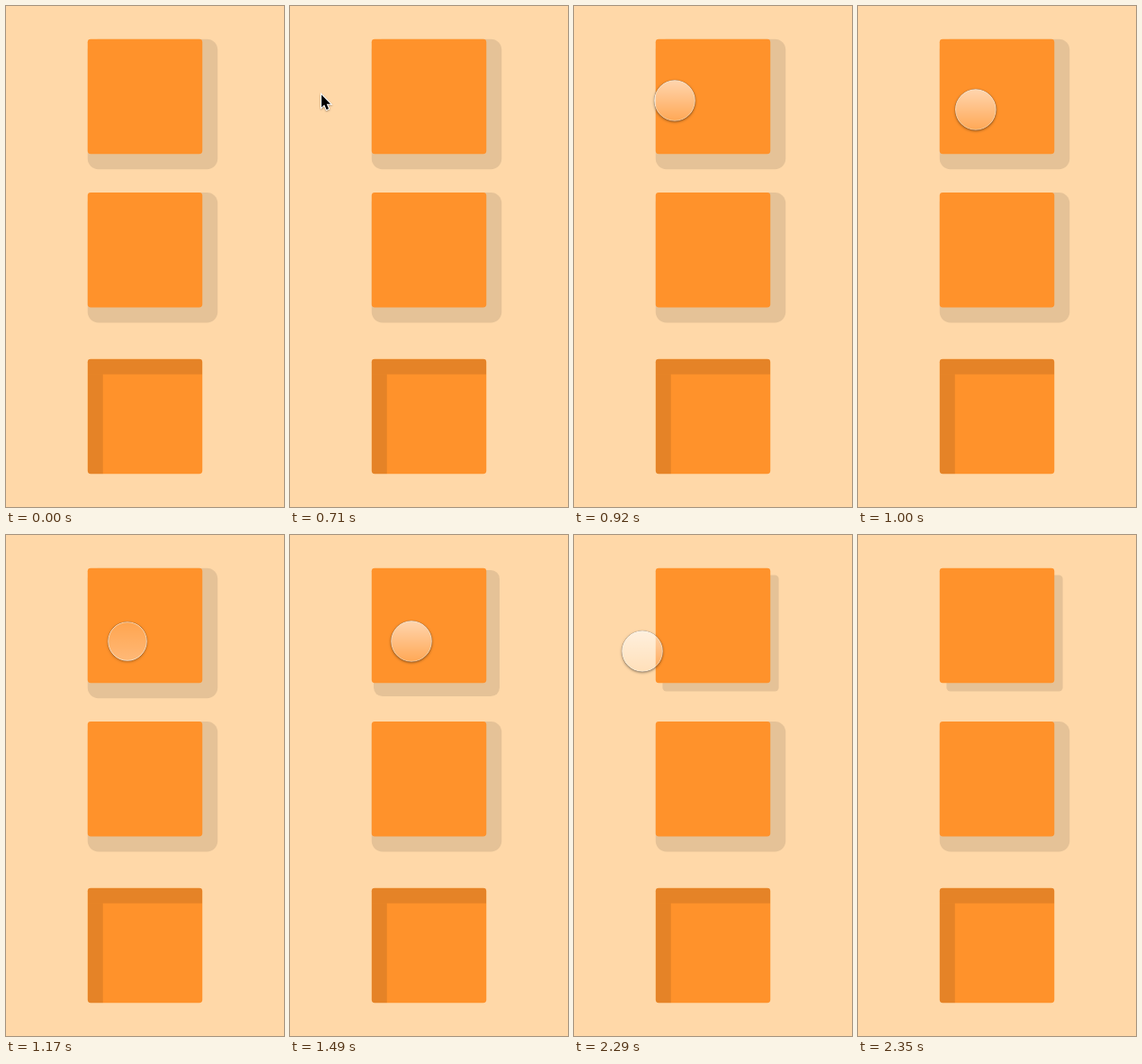
Animation, 309 px wide and 556 px high, one loop 4930 ms. Source, as an HTML page with a canvas:

```html
<!DOCTYPE html>
<html lang="en">
<head>
<meta charset="utf-8">
<title>Box shadow spread</title>
<style>
  html, body { margin: 0; width: 100%; height: 100%; overflow: hidden; background: #ffd8a8; }
  canvas { display: block; width: 309px; height: 556px; }
</style>
</head>
<body>
<canvas id="stage"></canvas>
<script>
const W = 309, H = 556, LOOP = 4930;
const SIZE = 127.5, LEFT = 90.75, OFFSET = 8.5, RADIUS = 3.4;
const SHADE = 'rgba(0,0,0,.1)';

// The picture is only refreshed at these moments.
const STEPS = [0, 710, 770, 800, 830, 860, 890, 920, 950, 980, 1000, 1030, 1170,
  1320, 1390, 1430, 1490, 1580, 1640, 1720, 1790, 1900, 2290, 2320, 2350];

// Pointer path: time, x, y
const PATH = [[710, 35, 98], [770, 58, 97], [830, 83, 98], [920, 112, 105],
  [980, 128, 113], [1030, 135, 118], [1790, 135, 118], [1900, 134, 118],
  [2260, 134, 118], [2290, 76, 129], [2320, 15, 141]];

const canvas = document.getElementById('stage');
const ctx = canvas.getContext('2d');
const dpr = window.devicePixelRatio || 1;
canvas.width = W * dpr;
canvas.height = H * dpr;

function ease(p) {
  if (p <= 0) return 0;
  if (p >= 1) return 1;
  const bezier = (s, a, b) => 3 * (1 - s) * (1 - s) * s * a + 3 * (1 - s) * s * s * b + s * s * s;
  let lo = 0, hi = 1;
  for (let i = 0; i < 24; i++) {
    const mid = (lo + hi) / 2;
    if (bezier(mid, .25, .25) < p) lo = mid; else hi = mid;
  }
  return bezier(lo, .1, 1);
}

function pathAt(t) {
  const i = PATH.findIndex(k => k[0] >= t);
  if (i <= 0) return PATH[0].slice(1);
  const [t0, x0, y0] = PATH[i - 1], [t1, x1, y1] = PATH[i];
  const p = (t - t0) / (t1 - t0);
  return [x0 + (x1 - x0) * p, y0 + (y1 - y0) * p];
}

function roundRect(x, y, size, r) {
  ctx.beginPath();
  ctx.roundRect(x, y, size, size, r);
}

function box(y) {
  ctx.fillStyle = '#ff922b';
  roundRect(LEFT, y, SIZE, RADIUS);
  ctx.fill();
}

function raisedBox(y, spread) {
  ctx.fillStyle = SHADE;
  roundRect(LEFT + OFFSET - spread, y + OFFSET - spread, SIZE + 2 * spread, RADIUS + spread);
  ctx.fill();
  box(y);
}

function insetBox(y) {
  box(y);
  ctx.save();
  roundRect(LEFT, y, SIZE, RADIUS);
  ctx.clip();
  ctx.fillStyle = SHADE;
  ctx.fillRect(LEFT, y, SIZE, 2 * OFFSET);
  ctx.fillRect(LEFT, y + 2 * OFFSET, 2 * OFFSET, SIZE);
  ctx.restore();
}

function arrow(x, y) {
  ctx.save();
  ctx.translate(x, y);
  const shape = new Path2D('M0 .5V14.5L3.2 11.6L5.6 17L8 16L5.7 10.7H10Z');
  ctx.shadowColor = 'rgba(0,0,0,.35)';
  ctx.shadowBlur = 2 * dpr;
  ctx.shadowOffsetY = dpr;
  ctx.strokeStyle = '#fff';
  ctx.lineWidth = 2;
  ctx.stroke(shape);
  ctx.shadowColor = 'transparent';
  ctx.fillStyle = '#000';
  ctx.fill(shape);
  ctx.restore();
}

function knob(x, y, pressed) {
  const r = pressed ? 21.8 : 22.8;
  const disc = new Path2D();
  disc.arc(x, y, r, 0, Math.PI * 2);

  // Soft shadow, kept outside the translucent disc
  ctx.save();
  const outside = new Path2D();
  outside.rect(0, 0, W, H);
  outside.addPath(disc);
  ctx.clip(outside, 'evenodd');
  ctx.shadowColor = pressed ? 'rgba(0,0,0,.3)' : 'rgba(0,0,0,.45)';
  ctx.shadowBlur = 3 * dpr;
  ctx.shadowOffsetY = dpr;
  ctx.fillStyle = '#000';
  ctx.fill(disc);
  ctx.restore();

  const [top, bottom] = pressed ? [.17, .36] : [.62, .2];
  const fill = ctx.createLinearGradient(0, y - r, 0, y + r);
  fill.addColorStop(0, `rgba(255,255,255,${top})`);
  fill.addColorStop(1, `rgba(255,255,255,${bottom})`);
  ctx.fillStyle = fill;
  ctx.fill(disc);

  ctx.beginPath();
  ctx.arc(x, y, r - .5, 0, Math.PI * 2);
  ctx.strokeStyle = `rgba(255,255,255,${pressed ? .5 : .35})`;
  ctx.lineWidth = 1;
  ctx.stroke();
}

function draw(now) {
  const time = now % LOOP;
  const t = STEPS.filter(s => s <= time).pop();
  ctx.setTransform(dpr, 0, 0, dpr, 0, 0);
  ctx.fillStyle = '#ffd8a8';
  ctx.fillRect(0, 0, W, H);

  raisedBox(36.75, 8.5 - 7.65 * ease((t - 1390) / 500));
  raisedBox(207, 8.5);
  insetBox(391.75);

  if (t >= 710 && t < 2350) {
    const [x, y] = pathAt(t);
    if (t < 770) arrow(x, y);
    else knob(x, y, t >= 1170 && t < 1320);
  }
}

const start = performance.now();
function tick() {
  draw(performance.now() - start);
  requestAnimationFrame(tick);
}
tick();
</script>
</body>
</html>
```
